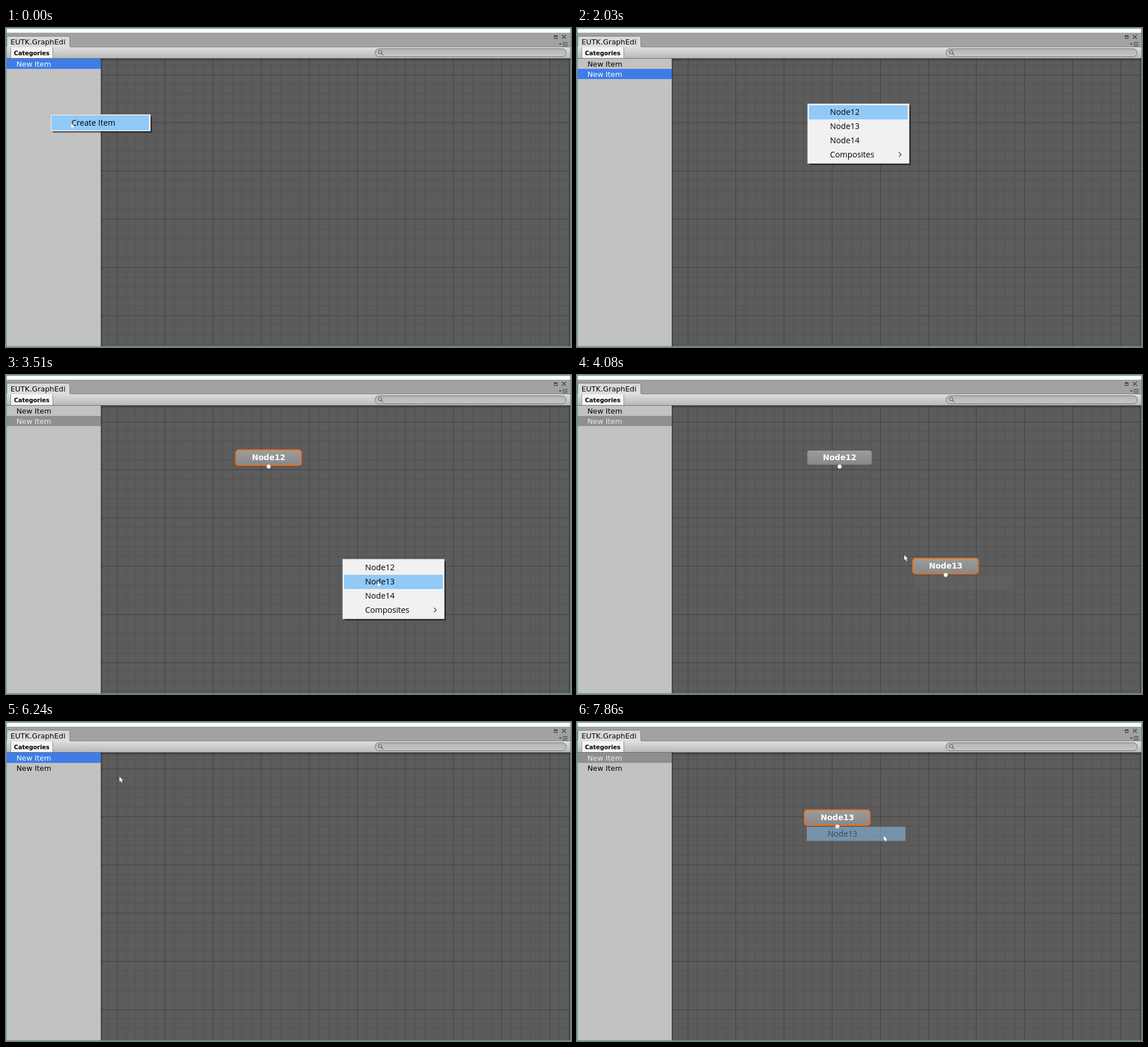
Animation of 996x562 px, one loop 8 s. Source, as an HTML page with a canvas:

```html
<!DOCTYPE html>
<html lang="en">
<head>
<meta charset="utf-8">
<title>Graph editor</title>
<style>
html, body { margin: 0; width: 100%; height: 100%; overflow: hidden; background: #5c5c5c; }
canvas { display: block; width: 996px; height: 562px; }
</style>
</head>
<body>
<canvas id="stage" width="996" height="562"></canvas>
<script>
const W = 996, H = 562, LOOP = 8000;
const c = document.getElementById('stage').getContext('2d');
const UI = '"DejaVu Sans", sans-serif';
const MENU = '14.2px "Open Sans", "Noto Sans", sans-serif';
const NODE_ITEMS = ['Node12', 'Node13', 'Node14', 'Composites'];
const BLUE = '#3e7de7', GRAY = '#8f8f8f', HILITE = '#91c9f7';

// time, x, y: the pointer is held between samples
const pointer = [
  [0, 115, 167], [120, 128, 190], [270, 170, 215], [410, 290, 192], [550, 395, 158], [690, 429, 146],
  [1130, 416, 139], [1280, 406, 133], [1880, 432, 147], [2030, 457, 158],
  [2470, 535, 250], [2620, 593, 324],
  [3210, 615, 341], [3360, 642, 356], [3510, 655, 363],
  [3960, 610, 335], [4080, 577, 317], [4230, 600, 325], [4370, 630, 334], [4510, 650, 340],
  [4810, 570, 313], [4960, 455, 274], [5090, 419, 262], [5230, 250, 160], [5360, 125, 82],
  [5510, 110, 72], [5660, 100, 67],
  [6100, 200, 96], [6250, 330, 137], [6390, 402, 156],
  [7150, 450, 176], [7290, 500, 193], [7590, 541, 200]
];

function at(list, t) {
  let hit = list[0];
  for (const k of list) if (k[0] <= t) hit = k;
  return hit;
}

function rect(x, y, w, h, fill) {
  c.fillStyle = fill;
  c.fillRect(x, y, w, h);
}

function text(s, x, y, font, fill, align = 'left') {
  c.font = font;
  c.fillStyle = fill;
  c.textAlign = align;
  c.fillText(s, x, y);
}

function fade(x0, y0, x1, y1, from, to) {
  const g = c.createLinearGradient(x0, y0, x1, y1);
  g.addColorStop(0, from);
  g.addColorStop(1, to);
  return g;
}

function rounded(x, y, w, h, r) {
  c.beginPath();
  c.roundRect(x, y, w, h, r);
}

function line(points, color, width) {
  c.beginPath();
  points.forEach(([x, y], i) => i ? c.lineTo(x, y) : c.moveTo(x, y));
  c.strokeStyle = color;
  c.lineWidth = width;
  c.stroke();
}

function grid() {
  rect(167, 54, W - 167, H - 54, '#5c5c5c');
  const gap = 84.8 / 5;
  for (const major of [false, true]) {
    const color = major ? '#494949' : '#545454';
    for (let i = -1; i < 49; i++) {
      if ((i % 5 === 0) !== major) continue;
      const x = Math.round(194.5 + i * gap), y = Math.round(81.5 + i * gap);
      if (x > 167) rect(x, 54, major ? 1.5 : 1.3, H - 54, color);
      if (y > 54 && y < H) rect(167, y, W - 167, major ? 1.5 : 1.3, color);
    }
  }
  rect(167, 54, W, 5, fade(0, 54, 0, 59, 'rgba(0,0,0,.35)', 'rgba(0,0,0,0)'));
  rect(167, 54, 4, H, fade(167, 0, 171, 0, 'rgba(0,0,0,.3)', 'rgba(0,0,0,0)'));
  rect(W - 5, 54, 4, H, fade(W - 1, 0, W - 5, 0, 'rgba(0,0,0,.3)', 'rgba(0,0,0,0)'));
}

function header() {
  rect(0, 0, W, 9, '#fdfdfd');
  rect(0, 9, W, 25, '#a2a2a2');
  rect(0, 8.5, W, 1, '#8a8a8a');
  rounded(1.5, 14.5, 111, 22, 3);
  c.fillStyle = fade(0, 14, 0, 34, '#d6d6d6', '#dedede');
  c.fill();
  c.strokeStyle = '#7c7c7c';
  c.lineWidth = 1;
  c.stroke();
  text('EUTK.GraphEdi', 8, 28.5, '12.8px ' + UI, '#000');

  rect(0, 33, W, 20, fade(0, 33, 0, 53, '#e0e0e0', '#b9b9b9'));
  rect(113, 33, W, 1, '#878787');
  rect(0, 53, W, 1, '#6c6c6c');
  rect(9, 34, 74, 19, '#f5f5f5');
  rect(8, 34, 1, 19, '#8c8c8c');
  rect(82, 34, 1, 19, '#8c8c8c');
  text('Categories', 14, 48, 'bold 10.3px ' + UI, '#000');

  rounded(650.5, 36.5, 337, 14, 7);
  c.fillStyle = fade(0, 36, 0, 51, '#b2b2b2', '#c9c9c9');
  c.fill();
  c.strokeStyle = '#727272';
  c.lineWidth = 1;
  c.stroke();
  c.beginPath();
  c.arc(659.5, 42.5, 3, 0, 7);
  c.strokeStyle = '#666';
  c.lineWidth = 1.1;
  c.stroke();
  line([[661.7, 44.7], [665, 48]], '#666', 1.4);

  c.strokeStyle = '#333';
  c.lineWidth = 1;
  c.strokeRect(966.5, 13.5, 5, 5);
  rect(966, 13, 6, 2, '#333');
  line([[980, 12], [987, 19]], '#444', 1.2);
  line([[987, 12], [980, 19]], '#444', 1.2);
  for (const y of [25, 28, 31]) rect(981, y, 9, 1, '#3c3c3c');
  c.beginPath();
  c.moveTo(974.5, 27);
  c.lineTo(979.5, 27);
  c.lineTo(977, 30);
  c.fillStyle = '#444';
  c.fill();
}

function sidebar(count, picked, color) {
  rect(0, 54, 167, H - 54, '#c2c2c2');
  for (let i = 0; i < count; i++) {
    const on = i === picked;
    if (on) rect(1, 54 + i * 18, 166, 18, color);
    text('New Item', 18.5, 68 + i * 18.3, '12.8px ' + UI,
      on ? (color === BLUE ? '#fff' : '#ececec') : '#000');
  }
}

function node(label, x, y, active) {
  const o = active ? 1 : 0;
  rounded(x - o, y - o, 113.5 + o * 2, 25 + o * 2, active ? 5 : 4);
  c.fillStyle = fade(0, y, 0, y + 25, '#9c9c9c', '#888');
  c.fill();
  if (active) {
    c.strokeStyle = '#f56c10';
    c.lineWidth = 2;
    c.stroke();
  }
  text(label, x + 57, y + 17, 'bold 13.7px ' + UI, '#fff', 'center');
  c.beginPath();
  c.arc(x + 57, y + 28.2, 3.5, 0, 7);
  c.fillStyle = '#fff';
  c.fill();
}

function panel(x, y, w, h) {
  rect(x + 5, y + 5, w - 2, h - 2, 'rgba(0,0,0,.18)');
  rect(x + 4, y + 4, w - 2, h - 2, 'rgba(0,0,0,.45)');
  rect(x, y, w, h, '#c6c6c6');
  rect(x + 1, y + 1, w - 2, h - 2, '#f1f1f1');
}

function row(label, x, y, lit) {
  if (lit) rect(x + 3, y, 174, 25, HILITE);
  text(label, x + 40, y + 17.3, MENU, '#000');
}

function nodeMenu(x, y, lit) {
  panel(x, y, 180, 106);
  NODE_ITEMS.forEach((s, i) => row(s, x, y + 3 + i * 25, i === lit));
  line([[x + 161.5, y + 86], [x + 165.5, y + 90], [x + 161.5, y + 94]], '#333', 1.1);
}

function createMenu() {
  panel(78, 152, 177, 30);
  rect(80, 154, 172, 26, HILITE);
  text('Create Item', 115.5, 171.7, MENU, '#000');
}

// The chosen row lingers briefly after its menu has closed.
function ghost(alpha, draw) {
  c.globalAlpha = alpha;
  draw();
  c.globalAlpha = 1;
}

function arrow(x, y) {
  c.beginPath();
  c.moveTo(x, y);
  c.lineTo(x, y + 9);
  c.lineTo(x + 2, y + 7.3);
  c.lineTo(x + 3.6, y + 10.8);
  c.lineTo(x + 5.2, y + 10);
  c.lineTo(x + 3.8, y + 6.8);
  c.lineTo(x + 6.4, y + 6.5);
  c.closePath();
  c.fillStyle = '#fff';
  c.fill();
  line([[x + .3, y], [x + 6.7, y + 6.5]], 'rgba(50,50,50,.75)', .8);
  line([[x + 4.2, y + 7], [x + 5.5, y + 10]], 'rgba(50,50,50,.55)', .7);
}

function draw(t) {
  const [, px, py] = at(pointer, t);
  const between = (a, b) => t >= a && t < b;
  grid();
  header();

  const [, picked, color] = at([
    [0, 0, BLUE], [120, 1, BLUE], [2320, 1, GRAY], [5810, 0, BLUE], [6850, 0, GRAY]
  ], t);
  sidebar(t < 120 ? 1 : 2, picked, color);

  if (between(2320, 5960)) node('Node12', 406, 133, t < 3810);
  if (between(3810, 5960)) {
    const drag = between(4810, 5090);
    const x = drag ? px - 57 : t < 4810 ? 593 : 362;
    const y = drag ? py - 16 : t < 4810 ? 324 : 246;
    node('Node13', x, y, true);
  }
  if (t >= 7720) node('Node13', 402, 156, true);

  if (t < 120) createMenu();
  if (between(1580, 2320)) nodeMenu(406, 133, t < 1880 ? -1 : 0);
  if (between(2890, 3810)) nodeMenu(593, 324, t < 3210 ? -1 : t < 3360 ? 0 : 1);
  if (between(7000, 7720)) nodeMenu(402, 156, t < 7150 ? -1 : t < 7290 ? 0 : 1);

  if (between(2320, 2620)) ghost(t < 2470 ? .5 : .06, () => row('Node12', 406, 136, true));
  if (between(3810, 4230)) {
    ghost(t < 3960 ? .8 : t < 4080 ? .4 : .04, () => row('Node13', 593, 352, true));
  }
  if (t >= 7720) ghost(t < 7860 ? .85 : .5, () => row('Node13', 402, 184.5, true));

  arrow(px, py);
  c.strokeStyle = '#5b949d';
  c.lineWidth = 1.4;
  c.strokeRect(.6, .6, W - 1.2, H - 1.2);
}

const start = performance.now();
function tick() {
  draw((performance.now() - start) % LOOP);
  requestAnimationFrame(tick);
}
tick();
</script>
</body>
</html>
```
